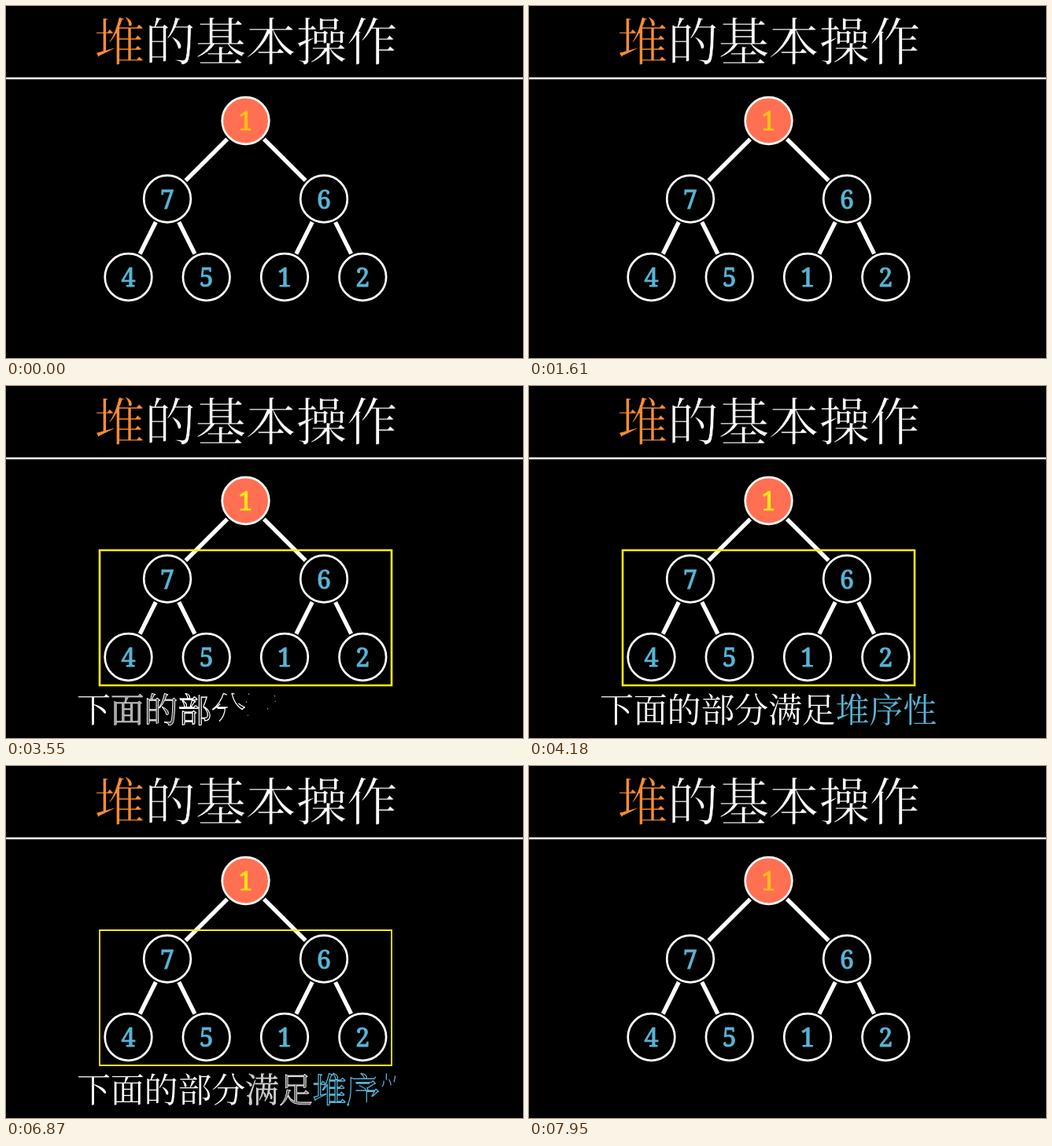
These frames come from a looping animation (657x448 px, 8 s). An HTML page:

```html
<!DOCTYPE html>
<html lang="zh-CN">
<head>
<meta charset="utf-8">
<title>堆的基本操作</title>
<style>
html, body { margin: 0; width: 100%; height: 100%; overflow: hidden; background: #000; }
svg { display: block; width: 657px; height: 448px; }
.han { font-family: "Noto Serif CJK SC", "Noto Sans CJK SC", "Noto Sans CJK", serif; font-weight: 300; }
.head { stroke: #000; stroke-width: 0.6px; }
.num { font: 32px "Noto Serif", "Liberation Serif", serif; text-anchor: middle; stroke-width: 1px; }
</style>
</head>
<body>
<svg id="stage" viewBox="0 0 657 448"></svg>
<script>
const LOOP = 8000, WRITE = 800;
const BOX_IN = 2457, TEXT_IN = BOX_IN + WRITE, ALL_OUT = 6614;
const BLUE = '#58b5d6', ORANGE = '#fa8c34', WHITE = '#fff', YELLOW = '#ffee0a';
const LAG = 0.2, THIN = 1.3, THICK = 2.6;
const stage = document.getElementById('stage');

function add(tag, attrs, text) {
  const el = document.createElementNS('http://www.w3.org/2000/svg', tag);
  for (const k in attrs) el.setAttribute(k, attrs[k]);
  if (text) el.textContent = text;
  stage.appendChild(el);
  return el;
}
const clamp = x => Math.min(1, Math.max(0, x));
const mix = (a, b, t) => a + (b - a) * t;

function paint(el, color) {
  el.setAttribute('fill', color);
  el.setAttribute('stroke', color);
}

// Heading
[...'堆的基本操作'].forEach((c, i) => add('text', {
  class: 'han head', x: 112 + 64.2 * i, y: 69.3, 'font-size': 64.6, fill: i ? WHITE : ORANGE
}, c));
add('rect', { x: 0, y: 90.8, width: 657, height: 2.5, fill: WHITE });

// Tree
const nodes = [
  [304.5, 146, 1], [205, 245.5, 7], [404, 245.5, 6],
  [155.5, 345, 4], [254.7, 345, 5], [354, 345, 1], [453.3, 345, 2]
];
const GAP = 33;
nodes.forEach(([x, y], i) => {
  if (!i) return;
  const [px, py] = nodes[(i - 1) >> 1];
  const d = Math.hypot(x - px, y - py);
  const ux = (x - px) / d * GAP, uy = (y - py) / d * GAP;
  add('line', { x1: px + ux, y1: py + uy, x2: x - ux, y2: y - uy, stroke: WHITE, 'stroke-width': 5.3 });
});
const digits = nodes.map(([x, y, n], i) => {
  add('circle', { cx: x, cy: y, r: 29.8, fill: i ? '#000' : '#ff7052', stroke: WHITE, 'stroke-width': 2.7 });
  const digit = add('text', { class: 'num', x, y: y + 12 }, String(n));
  paint(digit, BLUE);
  return digit;
});

// Highlight box, traced from its top right corner
const corners = [[490, 209], [119, 209], [119, 381], [490, 381], [490, 209]];
const box = add('path', { fill: 'none', stroke: YELLOW });

// Caption
const glyphs = [...'下面的部分满足堆序性'].map((c, i) => {
  const glyph = add('text', { class: 'han', x: 90 + 42.8 * i, y: 428, 'font-size': 43 }, c);
  paint(glyph, i < 7 ? WHITE : BLUE);
  return glyph;
});

function drawBox(p) {
  const s = clamp(p * 2) * 4;
  let d = 'M' + corners[0];
  for (let i = 0; i < 4 && s > i; i++) {
    const [a, b] = [corners[i], corners[i + 1]], t = clamp(s - i);
    d += 'L' + [mix(a[0], b[0], t), mix(a[1], b[1], t)];
  }
  box.setAttribute('d', s < 4 ? d : d + 'Z');
  box.setAttribute('stroke-width', mix(THIN, THICK, clamp(p * 2 - 1)));
  box.setAttribute('visibility', p > 0 ? 'visible' : 'hidden');
}

// Outline first, then fill while the outline fades away
function drawGlyph(el, p) {
  const line = clamp(p * 2), fill = clamp(p * 2 - 1);
  el.setAttribute('visibility', p > 0 ? 'visible' : 'hidden');
  el.setAttribute('fill-opacity', fill);
  el.setAttribute('stroke-width', mix(1.3, 0, fill));
  el.setAttribute('stroke-dasharray', line < 1 ? 200 * line ** 2 + ' 900' : 'none');
}

function render(t) {
  const out = 1 - clamp((t - ALL_OUT) / WRITE);
  const boxP = Math.min(clamp((t - BOX_IN) / WRITE), out);
  const textP = Math.min(clamp((t - TEXT_IN) / WRITE), out);
  drawBox(boxP);
  const span = 1 + LAG * (glyphs.length - 1);
  glyphs.forEach((g, i) => drawGlyph(g, clamp(textP * span - i * LAG)));
  paint(digits[0], `rgb(253,${Math.round(mix(190, 232, boxP))},26)`);
}

function tick(now) {
  render(now % LOOP);
  requestAnimationFrame(tick);
}
render(0);
requestAnimationFrame(tick);
</script>
</body>
</html>
```
